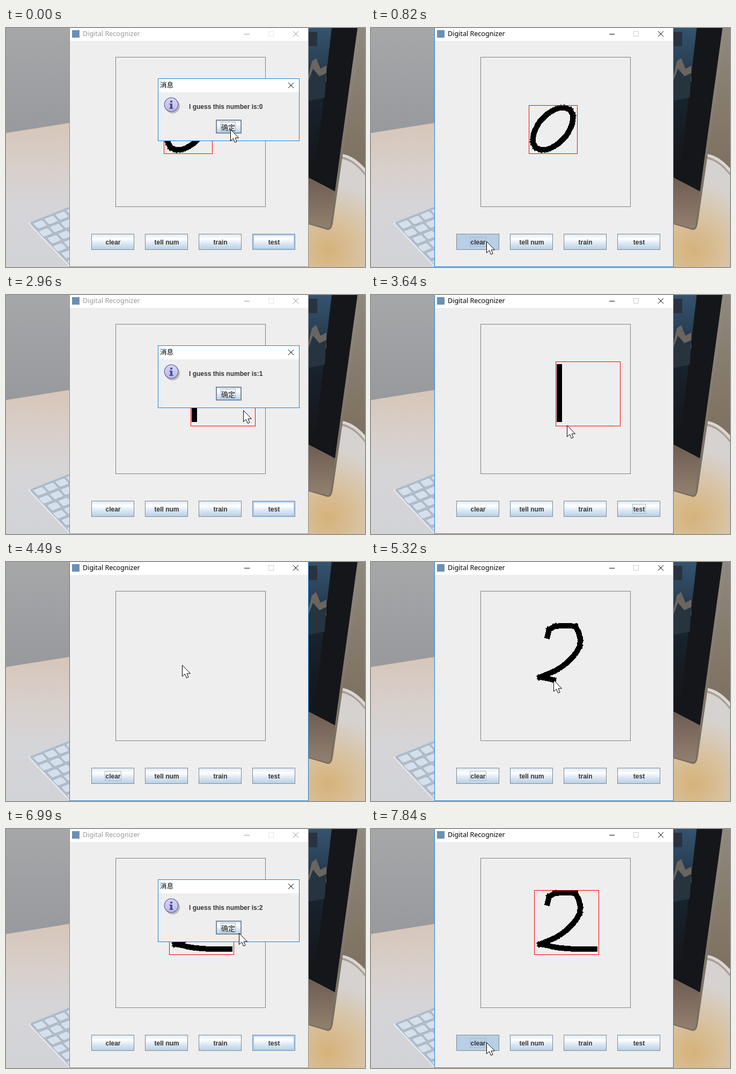
Write an HTML page that moves like this. It is 669 px wide and 446 px high and loops after 7.99 s.

```html
<!DOCTYPE html>
<html lang="en">
<head>
<meta charset="utf-8">
<title>Digital Recognizer</title>
<style>
html, body { margin: 0; width: 100%; height: 100%; overflow: hidden; }
svg { display: block; width: 669px; height: 446px; }
text { font: bold 12px "Liberation Sans", Arial, sans-serif; fill: #333; }
.caption { font: 12.55px "Noto Sans", sans-serif; fill: #000; }
.cjk { font: 12.5px "Noto Sans CJK SC", "Noto Sans CJK", sans-serif; fill: #000; }
.crisp { shape-rendering: crispEdges; }
.line { fill: none; stroke: #000; }
.idle .caption { fill: #999; }
.idle .line { stroke: #999; }
.idle .max { stroke: #e6e6e6; }
.max { fill: none; stroke: #ccc; }
.frame { fill: #eee; stroke: #1883d7; }
.idle .frame { stroke: #8c8c8c; }
.face { fill: url(#metal); stroke: #7a8a99; }
.glow { fill: none; stroke: #a8c8e6; stroke-width: 2; visibility: hidden; }
.ring { fill: none; stroke: #a3b8cc; visibility: hidden; }
.hover .glow, .focus .ring { visibility: visible; }
.hover .face { stroke: #7595b5; }
.press .face { fill: #b8cfe5; stroke: #7a8a99; }
.press .glow { visibility: hidden; }
</style>
</head>
<body>
<svg viewBox="0 0 669 446">
  <defs>
    <linearGradient id="metal" x2="0" y2="1">
      <stop stop-color="#dde8f3"/><stop offset=".3" stop-color="#fff"/>
      <stop offset=".6" stop-color="#dde8f3"/><stop offset="1" stop-color="#b8cfe5"/>
    </linearGradient>
    <linearGradient id="wall" x2="0" y2="1">
      <stop stop-color="#a6a7a9"/><stop offset="1" stop-color="#98999d"/>
    </linearGradient>
    <linearGradient id="desk" x2="0" y2="1">
      <stop stop-color="#d6c6b9"/><stop offset=".3" stop-color="#d8cfca"/>
      <stop offset=".6" stop-color="#d5d5d8"/><stop offset="1" stop-color="#d2d3d7"/>
    </linearGradient>
    <linearGradient id="room" x2="0" y2="1">
      <stop stop-color="#8f887c"/><stop offset="1" stop-color="#7d705f"/>
    </linearGradient>
    <radialGradient id="wood" gradientUnits="userSpaceOnUse" cx="600" cy="415" r="125">
      <stop stop-color="#d6b27a"/><stop offset=".4" stop-color="#d8bf98"/>
      <stop offset="1" stop-color="#d6d2cf"/>
    </radialGradient>
    <linearGradient id="screen" x2="0" y2="1">
      <stop stop-color="#34536f"/><stop offset=".25" stop-color="#2a4157"/>
      <stop offset=".45" stop-color="#182531"/><stop offset="1" stop-color="#15171b"/>
    </linearGradient>
    <linearGradient id="chin" x2="0" y2="1">
      <stop stop-color="#6d5c51"/><stop offset="1" stop-color="#92806f"/>
    </linearGradient>
    <linearGradient id="side" x2="0" y2="1">
      <stop stop-color="#8f8a80"/><stop offset="1" stop-color="#776c60"/>
    </linearGradient>
    <linearGradient id="info" x2="0" y2="1">
      <stop stop-color="#d6d6f6"/><stop offset="1" stop-color="#b9b9ee"/>
    </linearGradient>
  </defs>

  <!-- backdrop, left -->
  <rect width="119" height="200" fill="url(#wall)"/>
  <path d="M0 196L119 177V446H0Z" fill="url(#desk)"/>
  <g id="keys" transform="matrix(.93 -.37 .69 .73 43 363)">
    <rect x="-3" y="-1" width="180" height="126" rx="5" fill="#8d929b"/>
    <rect x="-3" y="-1" width="180" height="123" rx="5" fill="#e6eaef"/>
    <rect width="180" height="118" rx="4" fill="#b3bcc9"/>
  </g>

  <!-- backdrop, right -->
  <rect x="563" width="106" height="446" fill="url(#wood)"/>
  <path d="M563 0H669V269Q648 238 622 236L563 240Z" fill="url(#room)"/>
  <path d="M622 239Q648 241 672 272" fill="none" stroke="#a89f96" stroke-width="9"/>
  <path d="M622 237Q648 239 672 270" fill="none" stroke="#dcd7d2" stroke-width="5"/>
  <path d="M563 366L600 377Q607 377 609 364L662 0H650L607 300Z" fill="url(#side)"/>
  <path d="M563 0H655L613 305L563 279Z" fill="#15161a"/>
  <path d="M563 0H607L578 250H563Z" fill="url(#screen)"/>
  <path d="M563 92L570 62L578 56L586 76L597 70V100L580 96L563 112Z" fill="#6a655f"/>
  <path d="M563 100L572 76L584 90L597 84L594 130L563 136Z" fill="#25343f"/>
  <path d="M563 279L613 305L605 368Q603 376 596 373L563 364Z" fill="url(#chin)"/>
  <rect x="563" y="7" width="17" height="27" fill="#29333f"/>

  <!-- main window -->
  <g id="win">
    <rect class="frame crisp" x="118.5" y="-.5" width="445" height="446"/>
    <rect x="119" width="444" height="24" fill="#fff"/>
    <rect x="123" y="4" width="14" height="14" fill="#6c8fb3"/>
    <text class="caption" x="143" y="15">Digital Recognizer</text>
    <path class="line crisp" d="M444 11.5h10"/>
    <rect class="max crisp" x="489.5" y="6.5" width="9" height="9"/>
    <path class="line" d="M535 6l10 10m0-10l-10 10"/>
    <rect class="crisp" x="204.5" y="54.5" width="279" height="279" fill="none" stroke="#808080"/>
    <g id="buttons"></g>
  </g>

  <!-- pen strokes of 0, 1 and 2 -->
  <g id="pens" visibility="hidden">
    <path d="M371 153A47 27 -48 0 0 307 223A47 27 -48 0 0 371 153"/>
    <path d="M351 134V232"/>
    <path d="M329 138V130Q337 119 350 119H380Q397 143 386 164Q362 203 312 214Q350 223 380 224H417"/>
  </g>
  <path id="ink" class="crisp" fill="none" stroke="#000" stroke-width="10" stroke-linecap="square"/>
  <rect id="bounds" class="crisp" fill="none" stroke="#f00"/>

  <!-- message box -->
  <g id="dialog">
    <rect class="frame crisp" x="283.5" y="94.5" width="263" height="116"/>
    <rect x="284" y="95" width="262" height="25" fill="#fff"/>
    <text class="cjk" x="287" y="111">消息</text>
    <path class="line" d="M526 102l10 10m0-10l-10 10"/>
    <circle cx="310.5" cy="146" r="13.5" fill="#bbb"/>
    <circle cx="308" cy="143" r="12.8" fill="url(#info)" stroke="#6b6ba6" stroke-width="1.3"/>
    <path d="M306 135.5h4v3.5h-4zM304.5 141h5.5v8h1.5v2h-7v-2h1.5v-6h-1.5z" fill="#4f4f8c"/>
    <text id="guess" x="341" y="151"></text>
    <g id="ok">
      <rect class="face" x="392" y="172" width="46" height="24" stroke-width="2"/>
      <rect class="crisp" x="400.5" y="175.5" width="27" height="17" fill="none" stroke="#a3b8cc"/>
      <text class="cjk" x="401" y="189.5" style="font-size:13px;fill:#222">确定</text>
    </g>
  </g>
  <path id="cursor" d="M.5.5V21.5L5.5 17L8.5 24.5L12 23L9 16H15.5Z" fill="#fff" stroke="#000"/>
</svg>
<script>
const $ = id => document.getElementById(id);
const LOOP = 7990, STEPS = 58;
const CELL = 10, BOARD = { x: 204, y: 54 };
const TEST = [481, 396], OK = [418, 189], CLEAR = [215, 398];

// One round per digit: steps of the drawing and of the OK click,
// where the pointer enters and where it waits beside the message.
const rounds = [
  { draw: -20, drawn: -12, ok: 1, enter: OK, wait: OK },
  { draw: 10, drawn: 13, ok: 25, enter: [335, 160], wait: [442, 215] },
  { draw: 34, drawn: 41, ok: 52, enter: [328, 192], wait: [434, 194] }
].map((r, digit) => {
  const pen = $('pens').children[digit];
  return { ...r, digit, pen, test: r.drawn + 5, clear: r.ok + 5, box: cellBox(pen.getBBox()) };
});

// square of whole cells around a stroke
function cellBox({ x, y, width, height }) {
  const pad = 4;
  const span = (from, size, origin) => {
    const lo = Math.floor((from - pad - origin) / CELL), hi = Math.ceil((from + size + pad - origin) / CELL);
    return [origin + lo * CELL, (hi - lo) * CELL];
  };
  const [left, w] = span(x, width, BOARD.x), [top, h] = span(y, height, BOARD.y);
  return { x: left + .5, y: top + .5, width: Math.max(w, h), height: Math.max(w, h) };
}

function penPoint(pen, u) {
  const p = pen.getPointAtLength(u * pen.getTotalLength());
  return [Math.round(p.x), Math.round(p.y)];
}

const route = rounds.flatMap(r => [
  [r.draw - 1, r.enter], [r.drawn, penPoint(r.pen, 1)],
  [r.test - 1, TEST], [r.test + 1, TEST],
  [r.test + 4, r.wait], [r.ok - 1, r.wait],
  [r.ok, OK], [r.ok + 1, OK],
  [r.clear - 1, CLEAR], [r.clear, CLEAR]
]);

function pointerAt(s) {
  const i = route.findIndex(([step]) => step >= s);
  const [a, p] = route[i - 1], [b, q] = route[i];
  const u = (s - a) / (b - a), eased = u * u * (3 - 2 * u);
  return p.map((v, n) => Math.round(v + (q[n] - v) * eased));
}

function inkPath(pen, u) {
  const count = Math.ceil(24 * u);
  const pts = Array.from({ length: count + 1 }, (_, i) => penPoint(pen, u * i / count));
  return pts.slice(1).map((p, i) => `M${pts[i]}L${p}`).join('');
}

const within = (s, from, to) => s >= from && s <= to;
const show = (el, on) => el.setAttribute('visibility', on ? 'visible' : 'hidden');
const setAll = (el, attrs) => Object.entries(attrs).forEach(([k, v]) => el.setAttribute(k, v));
const setStates = (el, states) =>
  el.setAttribute('class', Object.keys(states).filter(k => states[k]).join(' '));

for (let row = 0; row < 6; row++)
  for (let col = 0; col < 8; col++)
    $('keys').innerHTML += `<rect x="${4 + col * 22 - (row % 2) * 3}" y="${4 + row * 19}" width="19" height="15"
      rx="3" fill="#d5e0ed" stroke="#9aa5b3" stroke-width=".7"/>`;

['clear', 'tell num', 'train', 'test'].forEach((name, i) => {
  const x = 159 + i * 100, half = name.length * 3;
  $('buttons').innerHTML += `<g>
    <rect class="face crisp" x="${x + .5}" y="384.5" width="79" height="29"/>
    <rect class="glow crisp" x="${x + 2}" y="386" width="76" height="26"/>
    <rect class="ring crisp" x="${x + 40.5 - half}" y="390.5" width="${half * 2}" height="17"/>
    <text x="${x + 40.5}" y="404" text-anchor="middle">${name}</text></g>`;
});
const [clearButton, , , testButton] = $('buttons').children;

function render(s) {
  const r = rounds.filter(({ draw }) => s >= draw).pop();
  const modal = within(s, r.test + 1, r.ok);
  const testFocus = within(s, r.test, r.clear - 1);

  setStates($('win'), { idle: modal });
  setStates($('ok'), { press: s === r.ok });
  setStates(testButton, { hover: within(s, r.test - 1, r.ok), press: s === r.test, focus: testFocus && !modal });
  setStates(clearButton, { hover: within(s, r.clear - 1, r.clear + 1), press: s === r.clear, focus: !testFocus });

  show($('dialog'), modal);
  $('guess').textContent = 'I guess this number is:' + r.digit;

  const progress = Math.min(1, (s - r.draw + 1) / (r.drawn - r.draw + 1));
  $('ink').setAttribute('d', s <= r.clear ? inkPath(r.pen, progress) : '');
  setAll($('bounds'), r.box);
  show($('bounds'), within(s, r.test + 1, r.clear));

  const tip = progress < 1 ? penPoint(r.pen, progress) : pointerAt(s);
  $('cursor').setAttribute('transform', `translate(${tip})`);
}

let last = -1;
function tick() {
  const t = performance.now() % LOOP / LOOP;
  const s = Math.min(STEPS - 1, Math.floor(t * STEPS + .7));
  if (s !== last) render(last = s);
  requestAnimationFrame(tick);
}
tick();
</script>
</body>
</html>
```
